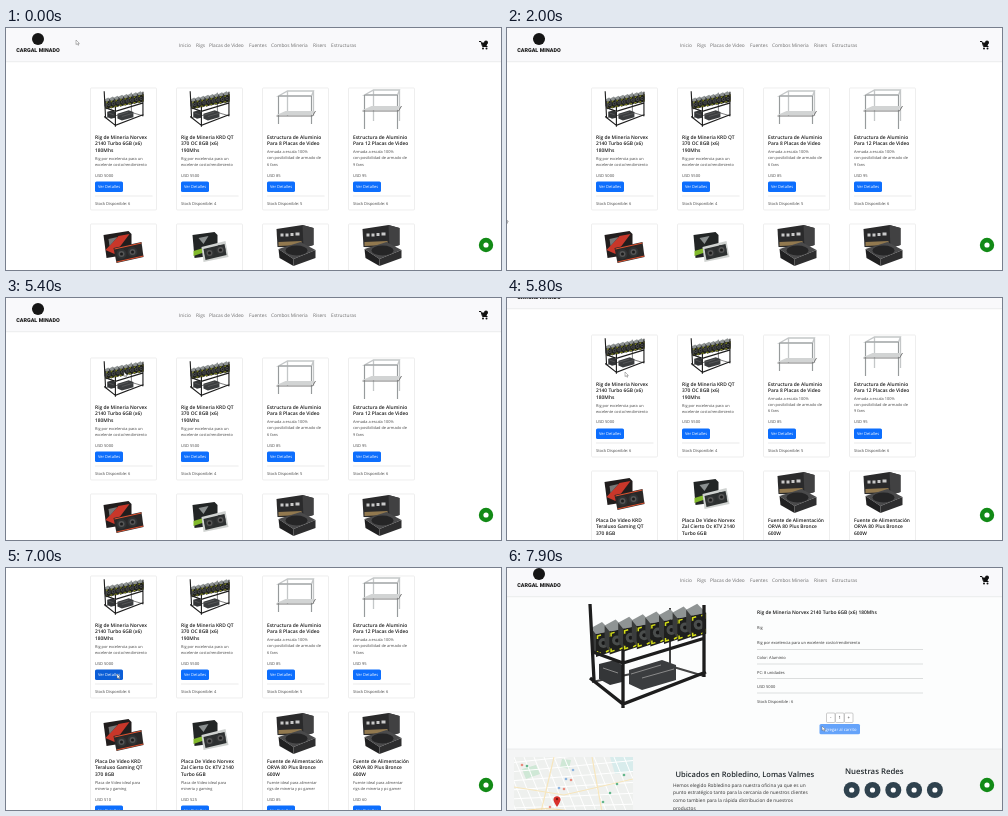
Animation, 495 px wide and 242 px high, one loop 8000 ms. Source, as an HTML page:

```html
<!DOCTYPE html>
<html lang="es">
<head>
<meta charset="utf-8">
<title>Tienda</title>
<style>
html, body { margin: 0; width: 100%; height: 100%; overflow: hidden; background: #fff; }
svg { display: block; font-family: "Open Sans", "Noto Sans", sans-serif; text-rendering: geometricPrecision; }
</style>
</head>
<body>
<svg id="stage" width="495" height="242" viewBox="0 0 495 242"></svg>
<script>
const LOOP = 8000, SWITCH = 7100;

const text = (x, y, str, size = 4, fill = '#444', extra = '') =>
  `<text x="${x}" y="${y}" font-size="${size}" fill="${fill}" ${extra}>${str}</text>`;
const lines = (x, y, step, rows, ...style) =>
  rows.map((row, i) => text(x, y + i * step, row, ...style)).join('');
const rect = (x, y, w, h, fill, extra = '') =>
  `<rect x="${x}" y="${y}" width="${w}" height="${h}" fill="${fill}" ${extra}/>`;
const circle = (x, y, r, fill, extra = '') =>
  `<circle cx="${x}" cy="${y}" r="${r}" fill="${fill}" ${extra}/>`;
const path = (d, fill) => `<path d="${d}" fill="${fill}"/>`;
const stroke = (d, color, width = 1) =>
  `<path d="${d}" fill="none" stroke="${color}" stroke-width="${width}"/>`;
const group = (x, y, inner, scale = 1) =>
  `<g transform="translate(${x} ${y}) scale(${scale})">${inner}</g>`;
const repeat = (n, make) => Array.from({ length: n }, (_, i) => make(i)).join('');
const BOLD = 'font-weight="600"', MIDDLE = 'text-anchor="middle"';

// Product pictures
function rig() {
  const unit = i => group(8 + i * 13.6, 28 - i * 2.6,
    path('M0 0L-5 -6L6 -12L15 -3z', '#8f9494') + path('M-5 -6L0 0V20L-5 13z', '#3a3c3c') +
    path('M0 0L15 -3V18L0 23z', '#1e1f1e') + circle(7.5, 9, 5, '#4a4d4c') + circle(7.5, 9, 2, '#161616') +
    stroke('M1.500 5V2L5 1M10 0L13.500 -1V3M1.500 17V20L5 19M10 18L13.500 16V13', '#d6df18', 1.5));
  return stroke('M82 2V60L4 76M82 60L116 70', '#444', 2) +
    path('M11 58l16 -4l7 5v17l-12 3l-11 -6z', '#343638') +
    path('M41 64l33 -10l14 5v15l-34 10l-13 -6z', '#3b3d3f') +
    stroke('M43 68l30 -9M54 72l32 -9M15 62l15 5', '#8a8a8a', 1) +
    repeat(8, unit) +
    stroke('M2 -2L6 74M35 44V102M116 -1V71M2 72L35 98L118 66M5 46L35 57L117 32', '#1d1d1d', 3.3);
}
const shelf = (h, level) =>
  stroke(`M2 6L11 1H37L35 6zM2 6V${h}M35 6V${h}M11 1V${h - 8}M37 1V${h - 8}`, '#c4c7c8', 1.3) +
  stroke(`M2 6H35M2 6V${h}M35 6V${h}`, '#85898a', .7) +
  path(`M0 ${level + 4}L9 ${level}H38L35 ${level + 4}z`, '#d2d4d4') +
  stroke(`M0 ${level + 5}H36L39 ${level}`, '#777', 1);
const fan = (x, y, r) => circle(x, y, r, '#303334') + circle(x, y, r * .6, '#555') + circle(x, y, r * .3, '#1c1c1c');
const redCard =
  path('M0 4L25 0L28 3V23L3 27z', '#211d1d') + path('M2 19L15 5L26 3L11 23z', '#c8372a') + path('M5 8l9 -2l-8 9z', '#777') +
  path('M10 17L38 11L40 26L13 32z', '#2a2828') + stroke('M11 18L38 12M13 31L40 25', '#e0522f', 1) +
  fan(18, 23, 5) + fan(29, 21, 5);
const greyCard =
  path('M0 3L22 0L25 3V23L2 26z', '#222525') + path('M1 19L24 12V16L1 24z', '#82b92c') + path('M6 6l10 -2l-5 8z', '#8b9090') +
  path('M9 15L33 9L36 25L11 30z', '#cfd2d0') + path('M11 17L32 12L34 23L13 28z', '#2d3030') +
  fan(17, 21, 5) + fan(28, 18, 5);
const powerBox =
  path('M1 4L27 0L38 3V20L28 23L2 22z', '#2a2a2b') + path('M27 0L38 3V20L28 23z', '#414142') +
  stroke('M5 10h3M10 10h3M15 9.500h3M20 9h4', '#c9c9c9', 3) + path('M3 17L26 16V20L3 21z', '#92794f') +
  path('M3 24L25 17L40 25L18 34z', '#4a4a4b') + path('M3 24L18 34V41L4 33z', '#202021') +
  path('M18 34L40 25V33L18 41z', '#2e2e2f') + '<ellipse cx="21" cy="25.500" rx="11" ry="5" fill="#252526"/>';

// Shop page
const rigText = ['Rig por excelencia para un', 'excelente costo/rendimiento'];
const frameText = n => ['Armada a escala 100%', 'con posibilidad de armado de', n + ' fans'];
const cardText = ['Placa de Video ideal para', 'mineria y gaming'];
const powerText = ['Fuente ideal para alimentar', 'rigs de mineria y pc gamer'];
const products = [
  [['Rig de Mineria Norvex', '2140 Turbo 6GB (x6)', '180Mhs'], rigText, 5000, 6, group(13, 4, rig(), .34)],
  [['Rig de Mineria KRD QT', '370 OC 8GB (x6)', '190Mhs'], rigText, 5500, 4, group(13, 4, rig(), .34)],
  [['Estructura de Aluminio', 'Para 8 Placas de Video'], frameText(6), 85, 5, group(14, 2, shelf(34, 21))],
  [['Estructura de Aluminio', 'Para 12 Placas de Video'], frameText(9), 95, 6, group(14, 1, shelf(40, 17))],
  [['Placa De Video KRD', 'Teraluxo Gaming QT', '370 8GB'], cardText, 510, 3, group(13, 7, redCard)],
  [['Placa De Video Norvex', 'Zal Cierto Oc KTV 2140', 'Turbo 6GB'], cardText, 525, 3, group(16, 8, greyCard)],
  [['Fuente de Alimentación', 'ORVA 80 Plus Bronce', '600W'], powerText, 85, 2, group(13, 1, powerBox)],
  [['Fuente de Alimentación', 'ORVA 80 Plus Bronce', '600W'], powerText, 60, 2, group(13, 1, powerBox)],
];
function card([title, about, price, stock, picture], i) {
  const aboutY = 52.5 + title.length * 6.3 + (title.length === 2 ? 0 : .3);
  return group(84.5 + i % 4 * 86, 60 + (i >> 2) * 136,
    rect(0, 0, 66, 122, '#fff', 'stroke="#e2e2e2" stroke-width=".6" rx="1"') + picture +
    lines(4.5, 51, 6.3, title, 4.9, '#1b1b1b', BOLD) +
    lines(4.5, aboutY, 6.2, about, 3.9) +
    text(4.5, 88.5, 'USD ' + price) +
    rect(4.5, 93.5, 28, 10.5, '#0d6efd', `rx="1.6" ${i ? '' : 'id="detail"'}`) +
    text(18.5, 100.3, 'Ver Detalles', 4, '#fff', MIDDLE) +
    stroke('M4.5 108H62', '#d4d4d4', .5) +
    text(4.5, 116.6, 'Stock Disponible: ' + stock));
}

const nav = [[173, 'Inicio'], [190, 'Rigs'], [203, 'Placas de Video'], [243, 'Fuentes'],
  [265, 'Combos Mineria'], [307, 'Risers'], [325, 'Estructuras']];
const header = rect(0, 0, 495, 33.5, '#f9f9fb') + stroke('M0 33.7H495', '#e4e5e7', .7) +
  circle(32, 11, 6, '#161616') +
  text(32, 23.8, 'CARGAL MINADO', 5.4, '#161616', MIDDLE + ' font-weight="900" font-family="Roboto, sans-serif"') +
  nav.map(([x, label]) => text(x, 19, label, 4.8, '#6e6e6e')).join('') +
  stroke('M473 13.5h2l1.5 5h5', '#111', 1) + path('M475.5 14.5h6l-1 3.5h-4z', '#111') +
  circle(477, 20.5, 1, '#111') + circle(480.5, 20.5, 1, '#111') + circle(480, 14.5, 2, '#111');

// Product page
const map = `<svg x="7" y="194" width="119" height="93">` + rect(0, 0, 119, 93, '#eef0ee') +
  path('M8 12l14 -4l4 9l-14 5zM84 60l18 5l-5 14l-16 -5zM48 2l9 1l-2 9l-9 -2z', '#cfe8d6') +
  path('M96 0h23v14l-18 3z', '#d8ecec') +
  stroke(repeat(18, i => `M${i * 10 - 40} 0l38 93M-5 ${i * 9 - 30}l130 ${-22 + i * 2}`), '#fff', 1) +
  stroke('M0 30L50 38L119 22M18 93L40 0M0 74L119 55M78 0L95 93', '#f7e6bd', 1.2) +
  stroke('M0 56Q60 40 119 84', '#f5d9a0', 1.1) +
  repeat(22, i => circle(8 + i * 37 % 104, 8 + i * 23 % 78, 1.3, ['#e98a7c', '#8db4df', '#63b68b'][i % 3])) +
  path('M43 50Q39 44 39.500 42A3.600 3.600 0 0 1 46.500 42Q47 44 43 50z', '#d9302a') +
  circle(43, 42, 1.2, '#7c1510') + '</svg>';

const stats = [[180, "15'", 'av. Lirio Paz'], [219, "30'", 'av. 9 de Trigo'], [255, "30'", 'Microcentro']];
const footer = rect(0, 186, 495, 120, '#f4f5f5') + stroke('M0 186H495', '#e0e3e4', .6) + map +
  text(168.5, 214, 'Ubicados en Robledino, Lomas Valmes', 7.5, '#22292d', BOLD) +
  lines(166, 223.8, 7.6, ['Hemos elegido Robledino para nuestra oficina ya que es un',
    'punto estratégico tanto para la cercania de nuestros clientes', 'como tambien para la rápida distribucion de nuestros',
    'productos'], 4.8, '#333') +
  stats.map(([x, n, place]) => text(x, 258.6, n, 4.8, '#4a7fa8', MIDDLE) + text(x, 265.4, place, 3.9, '#333', MIDDLE)).join('') +
  stroke('M199.500 253V265M237.500 253V265', '#444', .7) +
  text(338, 211, 'Nuestras Redes', 7.8, '#22292d', BOLD) +
  repeat(5, i => circle(344.7 + i * 20.8, 227, 8, '#2f424e') + circle(344.7 + i * 20.8, 227, 2.6, '#fff'));

const details = [[65.5, 'Rig'], [80.5, 'Rig por excelencia para un excelente costo/rendimiento'],
  [95.5, 'Color: Aluminio'], [110.5, 'PC: 8 unidades'], [125, 'USD 5000'], [139.6, 'Stock Disponible : 6']];
const productPage = rect(0, 0, 495, 300, '#fcfdfd') + group(81, 43, rig()) +
  text(250, 51, 'Rig de Mineria Norvex 2140 Turbo 6GB (x6) 180Mhs', 4.9, '#1b1b1b', BOLD) +
  details.map(([y, label]) => text(250, y, label, 4, '#333')).join('') +
  stroke('M250 86.500H416M250 101H416M250 115.500H416M250 130H416', '#b9bcbd', .5) +
  repeat(3, i => rect(319.5 + i * 9, 150, 8.5, 9.5, '#fff', 'stroke="#999" stroke-width=".5" rx="1"') +
    text(323.7 + i * 9, 156.4, '-1+'[i], 4.4, '#333', MIDDLE)) +
  rect(312.5, 161, 40.5, 10.3, '#65a3fa', 'rx="1.6"') +
  text(332.7, 167.7, 'Agregar al carrito', 4.2, '#fff', MIDDLE) + footer;

const $ = id => document.getElementById(id);
$('stage').innerHTML = `<g id="page"><g id="shop">${products.map(card).join('')}</g>` +
  `<g id="product">${productPage}</g>${header}</g>` +
  circle(480, 217, 7.2, '#128a16') + circle(480, 217, 2.6, '#fff') +
  `<path id="cursor" d="M0 0V4.600L1.200 3.600L2 5.300L2.800 5L2 3.400H3.400z" fill="#fff" stroke="#555" stroke-width=".4"/>`;

// Rows of [time, ...values], eased from one to the next
const scrollKeys = [[0, 0], [5500, 0], [5800, 23], [6100, 52], [7100, 52], [7101, 51], [7400, 51], [7900, 5], [8000, 0]];
const cursorKeys = [[0, 70, 12], [900, 110, 79], [1250, 40, 232], [1600, -2, 190], [2050, -2, 190],
  [2200, 60, 226], [2350, 136, 120], [2600, 46, 8], [2800, 41, 22], [3600, 41, 22], [4100, 224, 52],
  [4500, 182, 17], [5200, 118, 74], [5900, 118, 74], [6250, 168, 104], [6450, 92, 105], [6700, 111, 106],
  [7050, 111, 106], [7300, 210, 135], [7500, 210, 135], [7900, 315, 158], [8000, 315, 158]];
function sample(keys, t) {
  const i = keys.findIndex(key => key[0] > t), from = keys[i - 1], to = keys[i];
  const p = (t - from[0]) / (to[0] - from[0]), eased = p * p * (3 - 2 * p);
  return from.slice(1).map((v, k) => v + (to[k + 1] - v) * eased);
}

function draw() {
  const t = performance.now() % LOOP;
  const [scroll] = sample(scrollKeys, t);
  const [x, y] = sample(cursorKeys, t);
  $('page').setAttribute('transform', `translate(0 ${-scroll})`);
  $('cursor').setAttribute('transform', `translate(${x} ${y})`);
  $('shop').style.display = t < SWITCH ? '' : 'none';
  $('product').style.display = t < SWITCH ? 'none' : '';
  $('detail').setAttribute('fill', t > 6350 ? '#0b5ed7' : '#0d6efd');
  requestAnimationFrame(draw);
}
draw();
</script>
</body>
</html>
```
